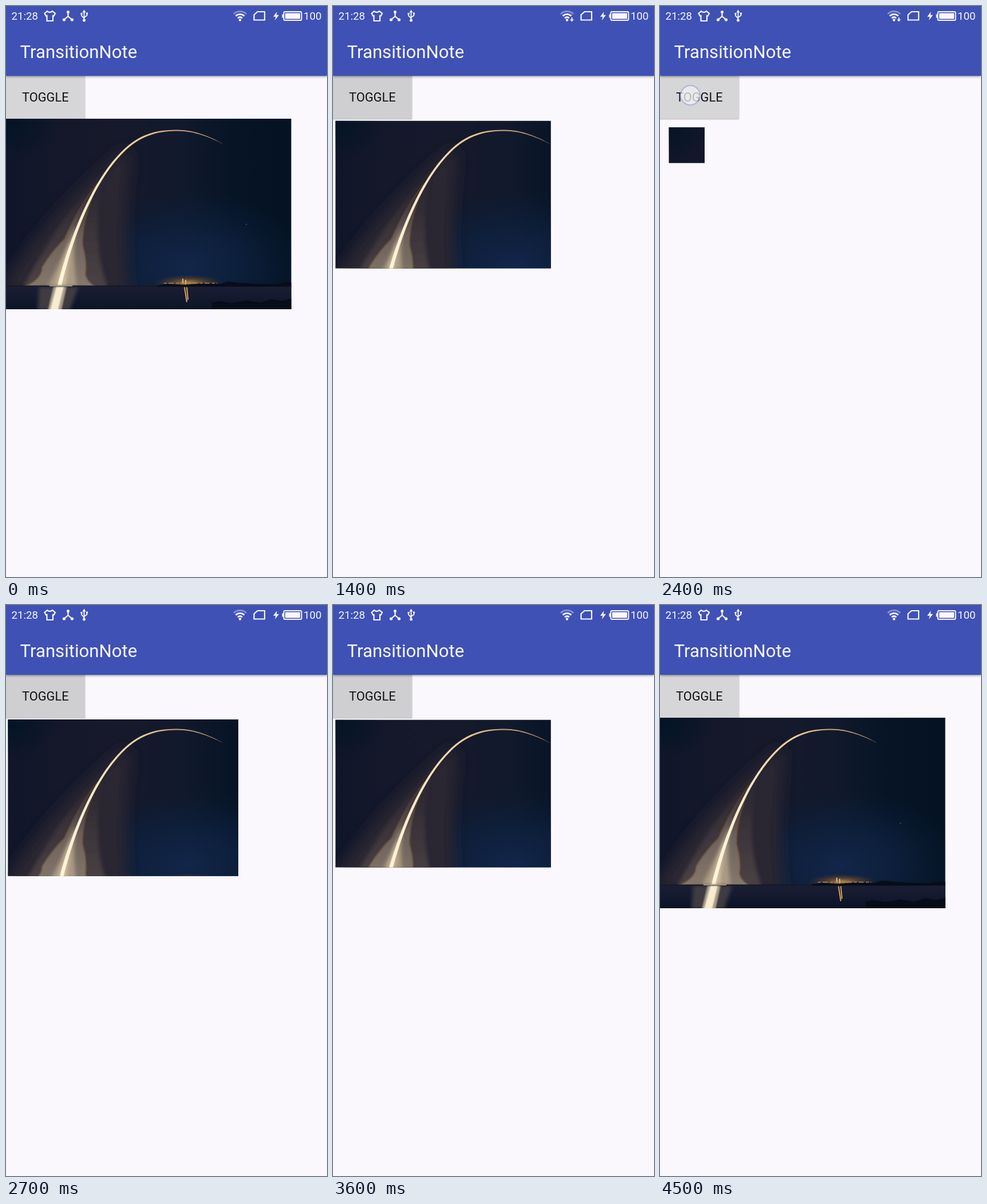
An HTML page for the animation above (4.6 s loop, 561x998 px).

```html
<!DOCTYPE html>
<html lang="en">
<head>
<meta charset="utf-8">
<title>Clip transition</title>
<style>
  @property --open { syntax: "<number>"; inherits: false; initial-value: 1; }

  html, body { margin: 0; width: 100%; height: 100%; overflow: hidden; }
  body { position: relative; background: #faf8fc; font-family: Roboto, sans-serif; }
  .stage { position: absolute; inset: 0; width: 561px; height: 998px; overflow: hidden; }
  .stage > * { position: absolute; }

  .bar {
    left: 0; top: 0; width: 561px; height: 122px;
    background: #3f51b5;
    box-shadow: 0 1px 4px rgba(0, 0, 0, .5);
  }
  .bar text { fill: #f8f8fd; }
  .icon { fill: none; stroke: #f8f8fd; stroke-width: 2.2; }
  .solid { fill: #f8f8fd; stroke: none; }

  .button {
    left: 0; top: 122px; width: 137.5px; height: 75px;
    background: #d6d5d7; color: #111;
    box-shadow: 0 1px 2px rgba(0, 0, 0, .3);
    font-size: 21.8px; line-height: 76px; text-indent: 28px;
  }
  .photo {
    left: 0; top: 196.5px; width: 498.5px; height: 333.5px;
    --shut: calc(1 - var(--open));
    clip-path: inset(
      calc(var(--shut) * 15.5px) calc(var(--shut) * 420.5px)
      calc(var(--shut) * 255.5px) calc(var(--shut) * 15.5px));
  }
  .touch {
    left: -18px; top: -18px; width: 32px; height: 32px;
    border: 2px solid #9dabd9; border-radius: 50%;
    background: #f1f0f4; opacity: 0;
  }

  /* Every change is a hard step on a 100 ms grid. */
  .photo, .button, .touch, .data { animation: 4600ms step-end infinite; }
  .photo { animation-name: clip; }
  .button { animation-name: press; }
  .touch { animation-name: tap; }
  .data { animation-name: data; opacity: 0; }

  @keyframes clip {
    0%, 60.86%, 97.82%, 100% { --open: 1; }
    30.43%, 78.26% { --open: .72; }
    32.6%, 80.43% { --open: .22; }
    34.78%, 82.6% { --open: 0; }
    56.52%, 93.47% { --open: .28; }
    58.69%, 95.65% { --open: .78; }
  }
  @keyframes press {
    0%, 34.78%, 63.04%, 82.6%, 97.82%, 100% { background: #d6d5d7; }
    28.26%, 54.34%, 76.08%, 91.3% { background: #cfced0; }
  }
  @keyframes tap {
    0%, 28.26%, 54.34%, 76.08%, 91.3%, 100% { opacity: 0; }
    26.08% { opacity: .94; transform: translate(59px, 134px); }
    52.17% { opacity: .75; transform: translate(53px, 156px); }
    73.91% { opacity: .72; transform: translate(54px, 158px); }
    89.13% { opacity: .75; transform: translate(53px, 155px); }
  }
  @keyframes data {
    0%, 54.34%, 100% { opacity: 0; }
    30.43% { opacity: 1; }
  }
</style>
</head>
<body>
<div class="stage">
  <div class="button">TOGGLE</div>

  <svg class="photo" viewBox="0 196.5 498.5 333.5" preserveAspectRatio="none">
    <defs>
      <linearGradient id="sky">
        <stop offset="0" stop-color="#101629"/>
        <stop offset=".35" stop-color="#17192b"/>
        <stop offset=".62" stop-color="#11192c"/>
        <stop offset=".8" stop-color="#061426"/>
        <stop offset="1" stop-color="#041222"/>
      </linearGradient>
      <radialGradient id="corner">
        <stop offset="0" stop-color="#021426"/>
        <stop offset="1" stop-color="#021426" stop-opacity="0"/>
      </radialGradient>
      <radialGradient id="blue">
        <stop offset="0" stop-color="#12264a"/>
        <stop offset=".5" stop-color="#0d213f" stop-opacity=".75"/>
        <stop offset="1" stop-color="#0a1c36" stop-opacity="0"/>
      </radialGradient>
      <radialGradient id="warm">
        <stop offset="0" stop-color="#b98642"/>
        <stop offset=".4" stop-color="#6d5031" stop-opacity=".75"/>
        <stop offset="1" stop-color="#403027" stop-opacity="0"/>
      </radialGradient>
      <linearGradient id="haze" x1="0" y1="1" x2="0" y2="0">
        <stop offset="0" stop-color="#4b4245"/>
        <stop offset=".5" stop-color="#3a3339"/>
        <stop offset="1" stop-color="#29262f" stop-opacity="0"/>
      </linearGradient>
      <linearGradient id="plume" x1="0" y1="1" x2="0" y2="0">
        <stop offset="0" stop-color="#85786c"/>
        <stop offset=".5" stop-color="#6b605b"/>
        <stop offset="1" stop-color="#3a3339" stop-opacity=".1"/>
      </linearGradient>
      <linearGradient id="trail" gradientUnits="userSpaceOnUse" x1="93" y1="489" x2="380" y2="241">
        <stop offset="0" stop-color="#fff6dc"/>
        <stop offset=".45" stop-color="#f7e7c4"/>
        <stop offset=".75" stop-color="#e9c796"/>
        <stop offset="1" stop-color="#a88262"/>
      </linearGradient>
      <linearGradient id="water" x1="0" y1="0" x2="0" y2="1">
        <stop offset="0" stop-color="#1b1e35"/>
        <stop offset="1" stop-color="#0b1426"/>
      </linearGradient>
      <filter id="soft3" x="-50%" y="-50%" width="200%" height="200%"><feGaussianBlur stdDeviation="3"/></filter>
      <filter id="soft12" x="-50%" y="-50%" width="200%" height="200%"><feGaussianBlur stdDeviation="12"/></filter>
      <filter id="soft1" x="-50%" y="-50%" width="200%" height="200%"><feGaussianBlur stdDeviation=".8"/></filter>
      <clipPath id="above"><path d="M0 196H499V489H0Z"/></clipPath>
    </defs>

    <path fill="url(#sky)" d="M0 196H499V531H0Z"/>
    <ellipse fill="url(#corner)" cx="0" cy="200" rx="95" ry="70"/>
    <ellipse fill="url(#blue)" cx="315" cy="455" rx="215" ry="135"/>

    <g clip-path="url(#above)">
      <path fill="#2a2630" filter="url(#soft12)" d="M-10 500C30 420 110 330 205 250C235 240 195 330 215 500Z"/>
      <path fill="url(#haze)" filter="url(#soft3)" d="M30 492C62 425 120 345 178 276C160 330 150 415 178 492Z"/>
      <path fill="url(#plume)" stroke="#7b5429" stroke-opacity=".55" stroke-width="2" filter="url(#soft1)"
        d="M32 490Q63 477 63 456Q80 428 102 407Q127 351 160 309Q132 376 134 418Q142 445 139 470Q143 483 157 490Z"/>
      <path fill="#aa9a83" filter="url(#soft3)" d="M72 492C91 455 109 415 122 386C117 425 119 458 124 492Z"/>
      <path fill="#e7d7b5" opacity=".6" filter="url(#soft3)" d="M86 492L113 408L104 492Z"/>
    </g>
    <path fill="url(#trail)" d="M90 489C107 420 148 298 214 243C244 218 275 216 300 216C330 216 358 228 380 241
      C358 230 330 218 300 218C276 218 246 221 216 245.5C151 300 113 420 97 489Z"/>
    <circle cx="420" cy="381" r=".8" fill="#7084a0"/>

    <ellipse fill="url(#warm)" cx="319" cy="483" rx="62" ry="14"/>
    <path fill="url(#water)" d="M0 489H499V531H0Z"/>
    <path fill="#50474a" opacity=".75" filter="url(#soft3)" d="M58 490H126L112 531H55Z"/>
    <path fill="#a69a86" filter="url(#soft1)" d="M83 490H106L97 531H73Z"/>
    <path fill="#f7ecd0" filter="url(#soft1)" d="M88 490H101L91 531H77Z"/>
    <path fill="#171821" d="M0 488H270V490H0Z"/>
    <path fill="#c0af91" d="M76 488H116V489.5H76Z"/>
    <path fill="#070d19" d="M265 488L282 485L310 487L345 484L375 485L388 481L405 483L440 485L472 486L490 482L499 483V490H265Z"/>
    <g fill="none" stroke="#d7a55e" stroke-width="1.6">
      <path stroke="#f2cf8b" d="M309 476V485M314 478V486"/>
      <path stroke="#b98544" stroke-dasharray="5 3 9 4" d="M276 484H369"/>
      <path stroke-width="2" d="M312 491L316 517M316 491L318 513"/>
    </g>
    <path fill="#060c18" d="M360 531V518L374 515L393 519L420 514L444 518L463 512L483 515L499 511V531Z"/>
  </svg>

  <div class="bar">
    <svg width="561" height="122">
      <text x="9.5" y="24" font-size="18.7">21:28</text>
      <text x="520" y="24" font-size="18.7">100</text>
      <text x="24.5" y="91" font-size="31.2">TransitionNote</text>
      <g class="icon">
        <path d="M72 9L67.5 13L70 17.5L71.5 17V26H82V17L83.5 17.5L86 13L81 9Q76.5 13 72 9Z"/>
        <path d="M108.500 10V18L101.500 24M108.500 18L115.500 24"/>
        <path d="M136.500 10V25M132 14V17L136.500 21.500M141.500 13V16.500L136.500 20" stroke-width="1.8"/>
        <g stroke-width="2.8">
          <path stroke-opacity=".4" d="M398 14A15.500 15.500 0 0 1 420 14"/>
          <path d="M401.500 17.500A10.600 10.600 0 0 1 416.500 17.500"/>
          <path d="M405 21.200A5.600 5.600 0 0 1 413 21.200"/>
        </g>
        <path d="M439.500 10H452V24.500H433.500V15.500Z"/>
        <rect x="485.500" y="10" width="31" height="15" rx="2" stroke-width="2"/>
      </g>
      <g class="solid">
        <circle cx="108.500" cy="10.500" r="2.500"/>
        <circle cx="101.500" cy="24" r="2.600"/>
        <circle cx="115.500" cy="24" r="2.600"/>
        <path d="M136.500 6.500L139.500 11.500H133.500ZM130.500 12H133.500V15H130.500ZM140 11.500H143V14.500H140Z"/>
        <circle cx="136.500" cy="25" r="2.500"/>
        <circle cx="409" cy="24.500" r="2.200"/>
        <path d="M473.500 10L467 18.800H471.300L470 25L477 15.800H472.700Z"/>
        <path d="M488 12.500H514V22.500H488ZM482.500 14.500H485V20.500H482.500Z"/>
      </g>
      <g class="data">
        <path fill="#3f51b5" d="M413 18H422V29H413Z"/>
        <path class="solid" d="M416.500 20H418.500V23.500H421L417.500 27.500L414 23.500H416.500Z"/>
      </g>
    </svg>
  </div>

  <div class="touch"></div>
</div>
</body>
</html>
```
